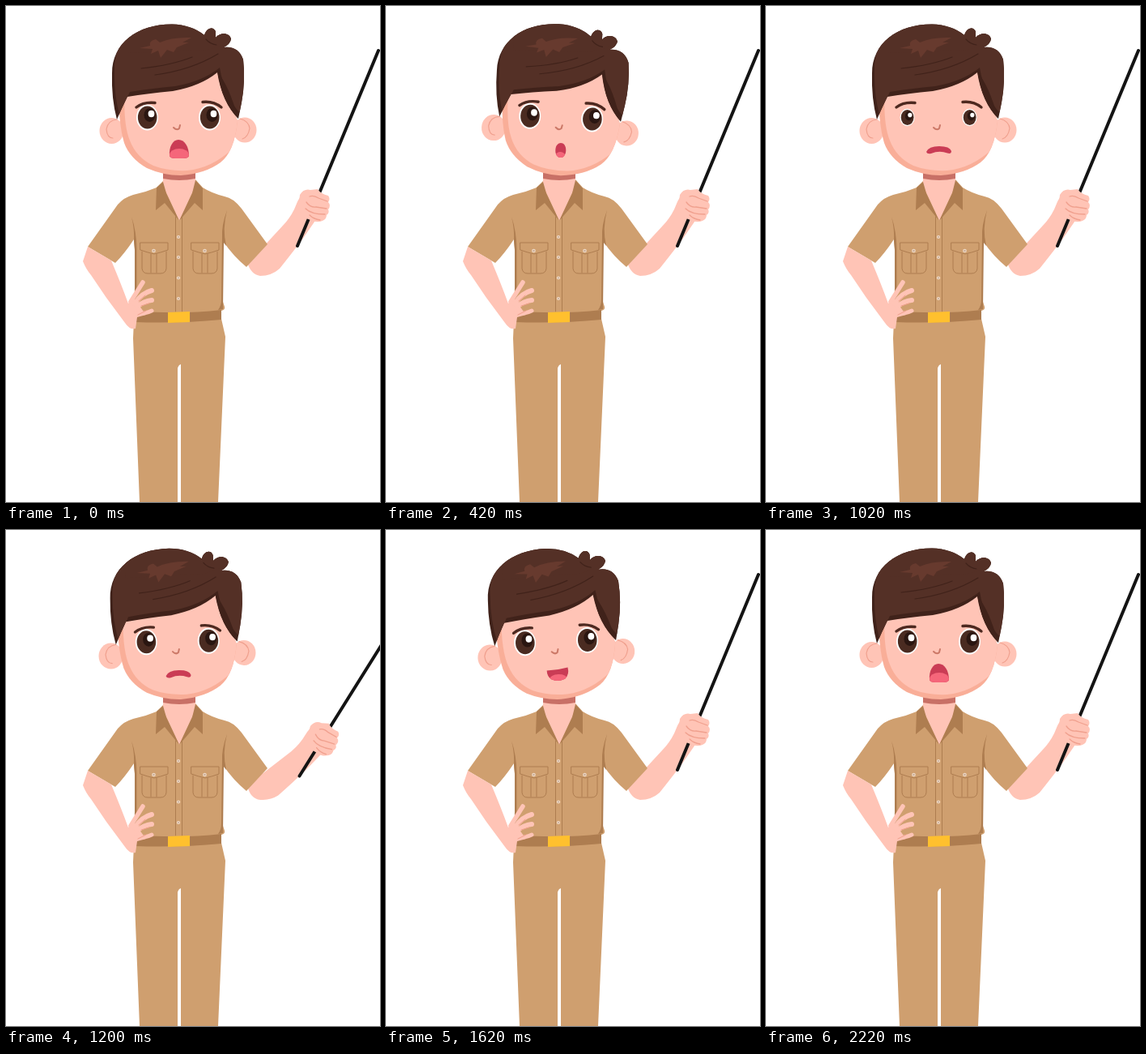
Recreate the animation shown at these times as an HTML page with a canvas. Size 462 px wide and 612 px high, loop 2.25 s.

```html
<!DOCTYPE html>
<html lang="en">
<head>
<meta charset="utf-8">
<title>Teacher with pointer</title>
<style>
html, body { margin: 0; width: 100%; height: 100%; overflow: hidden; background: #fff; }
canvas { display: block; width: 462px; height: 612px; }
</style>
</head>
<body>
<canvas id="stage" width="462" height="612"></canvas>
<script>
const ctx = document.getElementById('stage').getContext('2d');
const LOOP = 2250, STEP = 30;
const SKIN = '#ffc4b6', SKIN_SHADE = '#f9ae98', SKIN_LINE = '#f0a08e';
const HAIR = '#543026', HAIR_DARK = '#40221a', HAIR_LIGHT = '#673a2e';
const CLOTH = '#cf9f6f', CLOTH_DARK = '#ae7d50';
const RED = '#ca3c55', PINK = '#f5667a';

// Keys are [time, degrees], joined by straight lines.
const HEAD_KEYS = [[0, 0], [420, 2.75], [1020, 0], [1500, -2.95], [2220, 0], [2250, 0]];
const ARM_KEYS = [[0, 0], [420, 0], [720, 15.1], [1020, 0], [1305, 15.1], [1620, 0], [2250, 0]];
const MOUTH_KEYS = [[0, 'wide'], [300, 'round'], [600, 'line'], [900, 'frown'], [1500, 'smile'], [1920, 'wide']];

function tween(keys, t) {
  const i = Math.max(1, keys.findIndex(k => k[0] >= t));
  const [t0, v0] = keys[i - 1], [t1, v1] = keys[i];
  return v0 + (v1 - v0) * (t - t0) / (t1 - t0);
}

function fill(d, color) {
  ctx.fillStyle = color;
  ctx.fill(new Path2D(d));
}

function line(d, color, width = 1) {
  ctx.strokeStyle = color;
  ctx.lineWidth = width;
  ctx.stroke(new Path2D(d));
}

function oval(x, y, rx, ry, color) {
  ctx.fillStyle = color;
  ctx.beginPath();
  ctx.ellipse(x, y, rx, ry, 0, 0, Math.PI * 2);
  ctx.fill();
}

function turned(x, y, degrees, draw) {
  ctx.save();
  ctx.translate(x, y);
  ctx.rotate(degrees * Math.PI / 180);
  ctx.translate(-x, -y);
  draw();
  ctx.restore();
}

function clipped(path, draw) {
  ctx.save();
  ctx.clip(path);
  draw();
  ctx.restore();
}

function drawForearm() {
  fill('M298 316 Q302 331 314 333 Q328 333 338 324 Q354 304 366 288 L384 262 L366 231 Q360 240 356 251 Q350 263 341 272 L316 299Z', SKIN);
  line('M360 296 L460 55', '#141414', 4);
  fill('M363 233 Q368 225 376 227 L385 226 Q389 232 398 234 Q401 238 398 242 Q402 246 398 251 Q400 255 396 258 Q396 263 391 265 Q384 268 376 264 Q366 262 361 251Z', SKIN);
  line('M375 235 Q380 233 386 237 L397 241 M371 242 Q376 249 383 248 L396 250 M370 250 Q377 257 394 257 M375 258 Q380 263 388 264', SKIN_LINE, 1.3);
}

function drawPocket(x) {
  line(`M${x} 292 h34 v9 q-8 3 -17 5 q-9 -2 -17 -5 Z M${x + 2} 303 v21 q1 6 7 6 h16 q6 0 7 -6 v-21 M${x + 13} 306 v23 M${x + 20} 306 v23`, CLOTH_DARK);
  oval(x + 16.5, 302, 2.3, 2.3, '#f0ddca');
  oval(x + 16.5, 302, 1.2, 1.2, '#c8a994');
}

function drawBody() {
  fill('M158 388 L157 410 L165 612 H212 V447 Q213 443 216 442 V612 H262 L271 408 L266 386Z', CLOTH);

  fill('M194 216 L186 224 Q172 230 157 233 Q146 236 138 245 L101 297 L135 317 Q146 306 158 288 L160 315 L158 379 Q214 384 266 376 Q271 375 270 371 L268 365 V290 Q281 309 297 322 L323 294 L291 250 Q281 237 270 235 Q254 231 243 224 L234 214Z', CLOTH);
  fill('M155 260 Q159 276 158 290 L159 300 V376 H161.5 V300 Q161 277 155 260Z', CLOTH_DARK);
  fill('M273 252 Q266 271 267 286 L266 362 Q266 370 262 375 L268 374 L269 292 L272 296 Q267 275 273 252Z', CLOTH_DARK);

  fill('M194 203 H234 V222 L214 265 L194 222Z', SKIN);
  fill('M194 203 H234 V213 Q214 217 194 213Z', '#c87066');
  fill('M194 217 L186 224 L185 252 L196 243 L214 265 L198 231Z', CLOTH_DARK);
  fill('M234 215 L243 225 V252 L233 243 L214 265 L230 231Z', CLOTH_DARK);

  line('M209.5 260 V377 M217.5 260 V377', CLOTH_DARK);
  for (const y of [285, 310, 335.5, 361]) {
    oval(213, y, 2.1, 2.1, '#f0ddca');
    oval(213, y, 1, 1, '#c8a994');
  }
  drawPocket(166);
  drawPocket(229);

  fill('M158 376 Q214 381 266 375 V387 Q214 392 158 390Z', CLOTH_DARK);
  fill('M200 378 L227 377 V390 L200 391Z', '#ffc02e');
}

function drawRestingArm() {
  fill('M101 297 L95 315 Q99 325 105 332 L124 360 L147 391 Q153 400 160 398 L162 384 L173 381 L158 361 L151 367 Q143 345 130 314Z', SKIN);
  line('M154 365 L169 341', SKIN, 5.5);
  line('M159 367 Q168 354 180 351 M162 371 Q170 364 180 363', SKIN, 6);
  line('M160 379 Q169 381 180 376', SKIN, 5);
  line('M164 364 L172 357 M167 370 L177 367 M163 381 L173 376', SKIN_LINE);
}

function drawHair() {
  const shape = new Path2D('M137 140 Q130 114 131 83 C131 46 162 22.5 205 22.5 Q229 23 245 36 C248 26 257 25 259 32 L259 39 C266 31 277 34 278 41 Q277 47 269 51 Q287 49 293 66 Q296 92 291 119 L287 139 Q267 119 261 82 Q240 99 206 105 Q175 108 150 112 Q143 126 137 140Z');
  ctx.fillStyle = HAIR_DARK;
  ctx.fill(shape);
  clipped(shape, () => {
    ctx.translate(3, -6);
    ctx.fillStyle = HAIR;
    ctx.fill(shape);
    ctx.translate(-3, 6);
    fill('M150 38 Q202 9 246 36 L252 20 L290 38 L263 50 L246 55 L150 58Z', HAIR);
    fill('M261 81 Q276 99 287 140 L270 123Z', HAIR_DARK);
  });
  fill('M165 52 L178 49 Q176 43 185 41 L190 45 Q205 38 229 39 L218 45 L226 45 L211 51 L207 57 L199 54 L191 64 L188 55 L179 59 L181 53Z', HAIR_LIGHT);
  line('M167 77 Q205 73 230 63 M184 85 Q229 79 262 59 M247 41 Q252 47 260 48', HAIR_DARK, 1.2);
}

function drawEye(x, scale) {
  ctx.save();
  ctx.translate(x, 137.5);
  ctx.scale(scale, scale);
  oval(0, 0, 13.5, 16, '#fff');
  oval(0.2, 0, 11.8, 14, '#4a2b21');
  oval(3, -3, 7, 8.5, '#2a1611');
  oval(5, -4.5, 3.9, 4.2, '#fff');
  ctx.restore();
}

function openMouth(outline, x, y, rx, ry) {
  const shape = new Path2D(outline);
  ctx.fillStyle = RED;
  ctx.fill(shape);
  clipped(shape, () => oval(x, y, rx, ry, PINK));
}

const mouths = {
  wide: () => openMouth('M202 185 C201 174 206 165 213 165 C221 165 226 174 226 185 Q225 188 219 188 H209 Q203 188 202 185Z', 214, 184, 12, 8),
  round: () => openMouth('M208 178 C208 166 221 166 221 178 C221 190 208 190 208 178Z', 214.5, 185, 6, 5),
  line: () => line('M200.5 178 L228 178.5', RED, 2.2),
  frown: () => fill('M198 180 Q201 173 214 173 Q227 173 229 179 Q229 183 224 181.5 Q214 178 204 182 Q199 183 198 180Z', RED),
  smile: () => openMouth('M200 173 Q213 173 226 170 Q228 179 222 184 Q213 188 205 184 Q200 180 200 173Z', 214, 184, 11, 6)
};

function drawHead(mouth, eyeScale) {
  oval(130.5, 154, 15, 16, SKIN);
  oval(295, 153, 14.5, 15.5, SKIN);
  line('M137 140 Q126 141 124 152 Q125 163 132 163 M289 139 Q300 142 301 151 Q299 162 292 164', SKIN_LINE, 1.2);

  const face = new Path2D('M139 105 Q139 145 146 169 Q153 188 174 200 Q194 209 216 209 Q246 207 265 193 Q282 180 286 142 L265 75 H150Z');
  ctx.fillStyle = SKIN_SHADE;
  ctx.fill(face);
  clipped(face, () => fill('M147 95 Q144 145 153 166 Q161 187 182 197 Q200 204 224 203 Q254 200 279 177 L295 140 L270 60Z', SKIN));

  drawHair();
  drawEye(174.5, eyeScale);
  drawEye(251.5, eyeScale);
  line('M161 125 Q170 118 184 119.5 M243 118.5 Q256 117 266 125', '#4d2920', 3.4);
  line('M207 150 Q211 154 214 151 L215 147', '#cc7968', 2);
  mouths[mouth]();
}

function render(t) {
  const mouth = MOUTH_KEYS.filter(k => k[0] <= t).pop()[1];
  const eyeScale = t >= 900 && t < 1200 ? 0.67 : 1;
  ctx.fillStyle = '#fff';
  ctx.fillRect(0, 0, 462, 612);
  ctx.lineCap = ctx.lineJoin = 'round';
  turned(316, 315, tween(ARM_KEYS, t), drawForearm);
  drawBody();
  drawRestingArm();
  turned(213, 205, tween(HEAD_KEYS, t), () => drawHead(mouth, eyeScale));
}

function tick() {
  render(Math.floor(performance.now() % LOOP / STEP) * STEP);
  requestAnimationFrame(tick);
}
tick();
</script>
</body>
</html>
```
